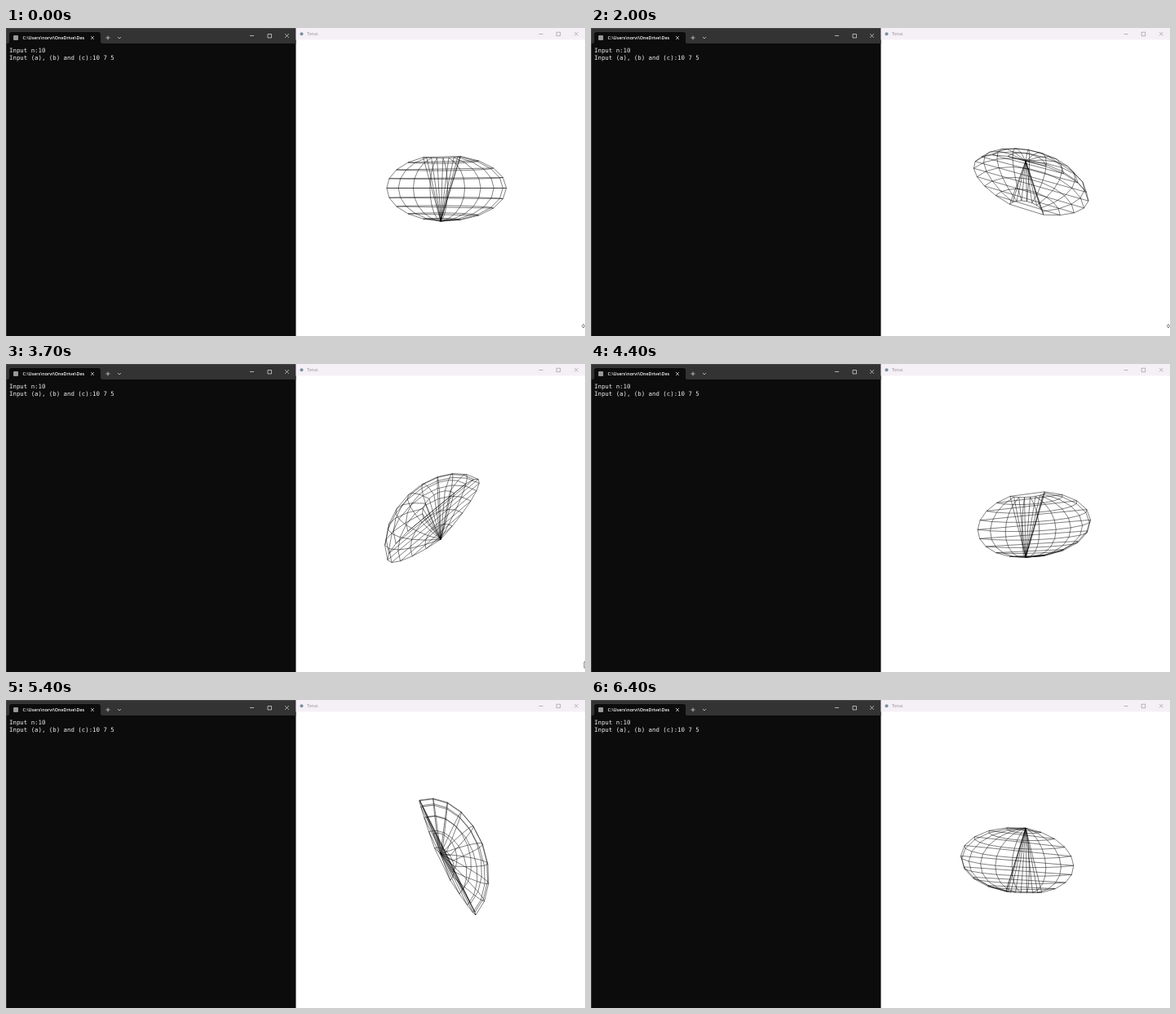
An HTML page that plays this animation: 710 by 378 pixels, repeating every 6500 ms.

```html
<!DOCTYPE html>
<html lang="en">
<head>
<meta charset="utf-8">
<title>Ellipsoid wireframe</title>
<style>
  html, body { margin: 0; width: 100%; height: 100%; overflow: hidden; background: #fff; }
  svg { display: block; }
  .line { fill: none; stroke-width: .7; }
  .tab { font: 600 5.4px "Open Sans", sans-serif; fill: #fff; }
  .console { font: 7.39px "DejaVu Sans Mono", monospace; fill: #f0f0f0; white-space: pre; }
  .title { font: 5.2px "Open Sans", sans-serif; fill: #8b878d; }
  #mesh { stroke-width: .5; }
</style>
</head>
<body>
<svg width="710" height="378" viewBox="0 0 710 378">
  <!-- terminal window -->
  <rect width="355.5" height="378" fill="#0c0c0c"/>
  <rect width="355.5" height="19" fill="#333"/>
  <path d="M2 19q2 0 2-2V8q0-3 3-3H113q3 0 3 3v9q0 2 2 2z" fill="#0c0c0c"/>
  <path class="line" d="M.3 378V.3H355.500" stroke="#555"/>
  <rect x="9" y="9" width="6" height="6" rx="1" fill="#999"/>
  <text class="tab" x="20.5" y="13.8">C:\Users\norvi\OneDrive\Des</text>
  <g class="line" stroke="#e4e4e4">
    <path d="M104 10l4 4m0-4l-4 4M122.500 12h5m-2.500-2.500v5M137 11l2 2 2-2"/>
    <path d="M299 9.500h5M321 7.500h4.500v4.500h-4.500zM342.200 7.200l4.600 4.600m0-4.600l-4.600 4.600"/>
  </g>
  <text class="console" x="4" y="29.800">Input n:10</text>
  <text class="console" x="4" y="38.600">Input (a), (b) and (c):10 7 5</text>

  <!-- graphics window -->
  <rect x="355.500" width="354.500" height="14.500" fill="#f5f0f6"/>
  <circle cx="362.500" cy="7.200" r="2" fill="#7b909c"/>
  <text class="title" x="369" y="9.300">Torus</text>
  <path class="line" stroke="#999" d="M653.500 7.500h5M675.200 5.200h4.500v4.500h-4.500zM697 5l4.500 4.500m0-4.500l-4.500 4.500"/>
  <path id="mesh" class="line" stroke="#000" stroke-linejoin="round"/>
  <path id="cursor" class="line" stroke="#444"/>
</svg>
<script>
const LOOP = 6500, TICK = 100;
const N = 10, [A, B, C] = [10, 7, 5];
const CENTER = { x: 533, y: 196.5 };
const SCALE = { x: 7.9, y: 8.12 };
const EYE = 51;                      // camera distance in model units
const FIRST_TICK = 6, HOLDS = [19, 30, 32, 46, 59], DOUBLE = 33;
const rad = degrees => degrees * Math.PI / 180;

const mesh = document.getElementById('mesh');
const cursor = document.getElementById('cursor');

// Half an ellipsoid; each row and column later closes on itself.
const points = Array.from({ length: N }, (_, i) => Array.from({ length: N }, (_, j) => {
  const u = rad(90 - 180 / N * i), v = rad(180 / N * j);
  return [A * Math.cos(u) * Math.cos(v), C * Math.sin(u), B * Math.cos(u) * Math.sin(v)];
}));

function stepAt(tick) {
  if (tick < FIRST_TICK) return 0;
  const held = HOLDS.filter(h => h <= tick).length;
  return tick - FIRST_TICK + 1 - held + (tick >= DOUBLE ? 1 : 0);
}

function projector(step) {
  const pitch = rad(-10 * step), yaw = rad(10 + 10 * step);
  const [cp, sp, cy, sy] = [Math.cos(pitch), Math.sin(pitch), Math.cos(yaw), Math.sin(yaw)];
  return ([x, y, z]) => {
    const turnedX = x * cy + z * sy, turnedZ = z * cy - x * sy;
    const depth = EYE / (EYE + y * sp + turnedZ * cp);
    const px = CENTER.x + SCALE.x * turnedX * depth;
    const py = CENTER.y + SCALE.y * (y * cp - turnedZ * sp) * depth;
    return px.toFixed(2) + ' ' + py.toFixed(2);
  };
}

const closedLine = list => 'M' + list.join('L') + 'Z';

function cursorPath(time) {
  if (time < 2300) return 'M708 363.500l1.600 2.300-1.600 2.300-1.600-2.300z';
  return time < 3800 ? 'M710 365.500h-1v7.500h1' : '';
}

function draw(now) {
  const time = now % LOOP;
  const rows = points.map(row => row.map(projector(stepAt(Math.floor(time / TICK)))));
  const columns = rows[0].map((_, j) => rows.map(row => row[j]));
  mesh.setAttribute('d', [...rows.slice(1), ...columns].map(closedLine).join(''));
  cursor.setAttribute('d', cursorPath(time));
}

let start;
function loop(now) {
  start ??= now;
  draw(now - start);
  requestAnimationFrame(loop);
}
draw(0);
requestAnimationFrame(loop);
</script>
</body>
</html>
```
